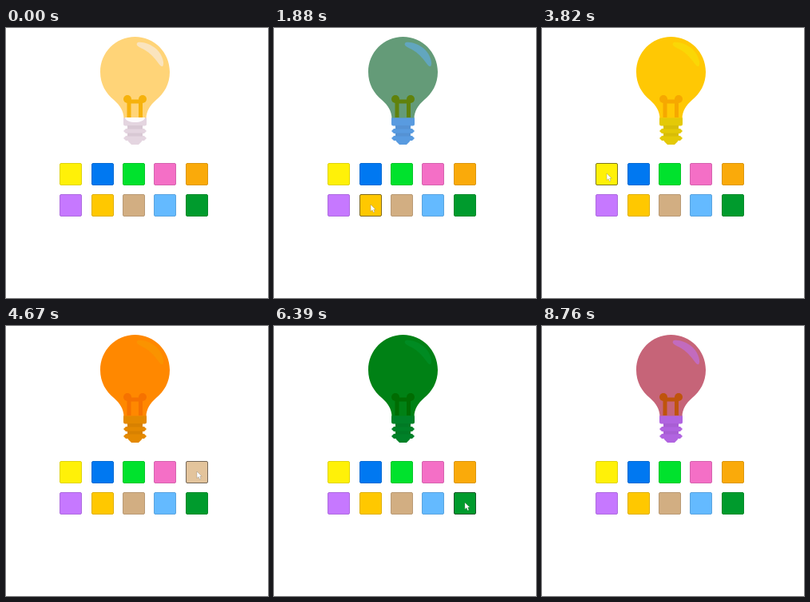
Animation of 328 by 338 pixels, one loop 8880 ms. Source, as an HTML page:

```html
<!DOCTYPE html>
<html lang="en">
<head>
<meta charset="utf-8">
<title>Bulb colours</title>
<style>
  html, body { margin: 0; width: 100%; height: 100%; overflow: hidden; background: #fff; }
  svg { display: block; width: 328px; height: 338px; }
</style>
</head>
<body>
<svg viewBox="0 0 328 338" xmlns="http://www.w3.org/2000/svg">
  <defs><path id="rib" d="M150 0H173L176 3L173 6H150L147 3Z"/></defs>
  <g data-part="base">
    <rect x="147" y="111" width="29" height="11.5" rx="2.5"/>
    <use href="#rib" y="126"/>
    <use href="#rib" y="135"/>
    <path d="M153 140H170V142L166 146H157L153 142Z"/>
  </g>
  <path data-part="core" d="M152 122H171V126.500H152ZM152 131.500H171V135.500H152Z"/>
  <path data-part="glass" d="M161.500 11C185.500 11 205 30.500 205 55C205 70 198 82 188 90C180 97 176 104 175.500 112.500H147.500C147 104 143 97 135 90C125 82 118 70 118 55C118 30.500 137.500 11 161.500 11Z"/>
  <path data-part="shine" d="M164 19C165 16 180 18 189 27C196 34 199 45 196 48C193 49 190 42 185 37C179 30 173 27 167 24C164 22 163 21 164 19Z"/>
  <g data-part="wire">
    <circle cx="152" cy="89" r="5"/>
    <circle cx="171" cy="89" r="5"/>
    <path d="M152 89.500H171V94.500H152ZM151.500 89H156.500V112H151.500ZM166 89H171V112H166Z"/>
  </g>
  <path id="rim" d="M149 112H174C173 120 150 120 149 112Z" fill="#fdfbff"/>
  <g id="swatches"></g>
  <path id="cursor" d="M0 0V8.500L2 6.700L3.500 10L5 9.300L3.700 6.200H6.200Z" fill="#fff" stroke="#444" stroke-opacity=".3" stroke-width=".8"/>
</svg>
<script>
const LOOP = 8880, MOVE = 420, PAUSE = 80, PRESS = 280;
const SIZE = 28, PITCH = 39.4, LEFT = 67.2, TOP = 169;
const $ = id => document.getElementById(id);
const hex = s => [1, 3, 5].map(i => parseInt(s.slice(i, i + 2), 16));
const rgb = c => `rgb(${c.map(Math.round)})`;
const mix = (a, b, k) => a.map((v, i) => v + (b[i] - v) * k);
const smooth = u => u * u * (3 - 2 * u);

const PARTS = { glass: '#ffd478', shine: '#fae4be', wire: '#f6b20c', base: '#e4d5e0', core: '#d8c8d4' };
const COLORS = {
  yellow: '#fff108', blue: '#0078f1', green: '#00e22d', pink: '#f46fc6', orange: '#faaa0a',
  purple: '#c678ff', amber: '#ffc800', tan: '#d2ae82', sky: '#64baff', forest: '#009b2d'
};
// Lamp filters that differ from their button colour
const FILTERS = { pink: '#ff6bbc', orange: '#ffa400' };
const CLICKS = {
  sky: 980, amber: 1950, green: 2600, yellow: 3270,
  orange: 4600, forest: 5470, pink: 6880, purple: 7440
};

const swatches = Object.keys(COLORS).map((name, i) => {
  const x = Math.round(LEFT + i % 5 * PITCH), y = Math.round(TOP + Math.floor(i / 5) * PITCH);
  const el = document.createElementNS('http://www.w3.org/2000/svg', 'rect');
  const attrs = { x: x + .5, y: y + .5, width: SIZE - 1, height: SIZE - 1, rx: 1.5 };
  for (const key in attrs) el.setAttribute(key, attrs[key]);
  $('swatches').append(el);
  return { name, color: hex(COLORS[name]), x, y, el };
});

// The pointer waits below the stage, visits each clicked swatch and leaves again
const OUT = [160, 346];
const stops = Object.entries(CLICKS).map(([name, time]) => {
  const s = swatches.find(s => s.name === name);
  return { time: time - PAUSE, at: [s.x + SIZE / 2, s.y + SIZE / 2 - 1] };
});
stops.push({ time: 8300, at: OUT });

function pointer(t) {
  let at = OUT;
  for (const stop of stops) {
    const u = Math.min(1, Math.max(0, (t - stop.time) / MOVE + 1));
    at = mix(at, stop.at, smooth(u));
  }
  return at;
}

function draw(t) {
  const name = Object.keys(CLICKS).filter(n => CLICKS[n] <= t).pop();
  const filter = hex(name ? FILTERS[name] || COLORS[name] : '#ffffff');
  for (const el of document.querySelectorAll('[data-part]')) {
    el.setAttribute('fill', rgb(hex(PARTS[el.dataset.part]).map((v, i) => v * filter[i] / 255)));
  }
  $('rim').style.display = name ? 'none' : '';

  const [px, py] = pointer(t);
  for (const s of swatches) {
    const over = px >= s.x && px <= s.x + SIZE && py >= s.y && py <= s.y + SIZE;
    const pressed = s.name === name && t - CLICKS[name] < PRESS;
    const fill = pressed ? mix(s.color, [215, 210, 235], .65) : s.color;
    s.el.setAttribute('fill', rgb(fill));
    s.el.setAttribute('stroke', rgb(mix(fill, [40, 40, 40], over ? .6 : .15)));
  }
  $('cursor').setAttribute('transform', `translate(${px.toFixed(2)} ${py.toFixed(2)})`);
}

const start = performance.now();
function tick() {
  draw((performance.now() - start) % LOOP);
  requestAnimationFrame(tick);
}
tick();
</script>
</body>
</html>
```
